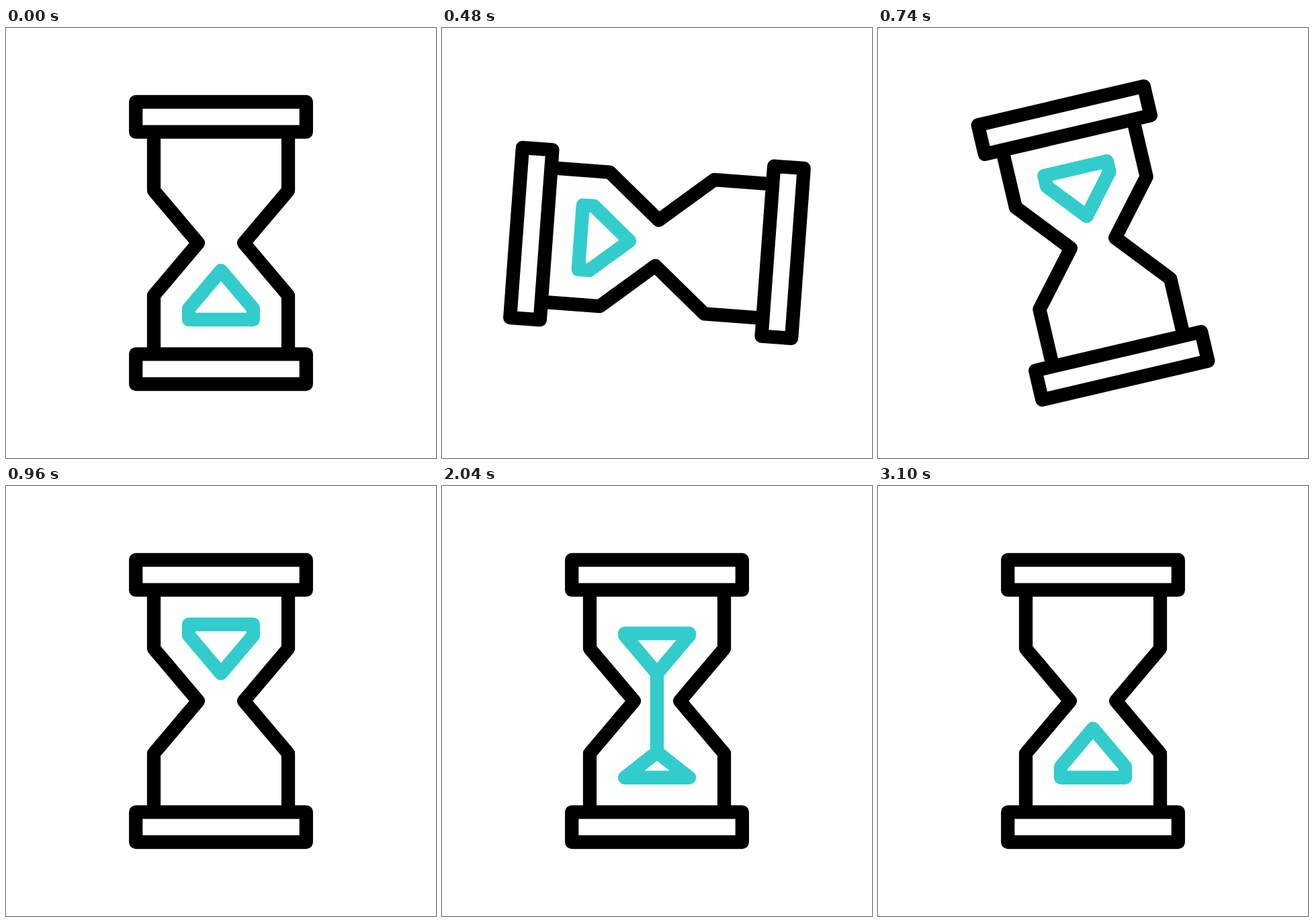
Write an HTML page that moves like this. It is 640 px wide and 640 px high and loops after 3600 ms.

```html
<!DOCTYPE html>
<html lang="en">
<head>
<meta charset="utf-8">
<title>Hourglass</title>
<style>
  html, body { margin: 0; width: 100%; height: 100%; overflow: hidden; background: #fff; }
  svg { display: block; width: 100%; height: 100%; }
  path { fill: none; stroke-width: 20.3; stroke-linecap: round; stroke-linejoin: round; }
  .glass { stroke: #000; }
  .sand { stroke: #3cc; }
</style>
</head>
<body>
<svg viewBox="0 0 640 640">
  <g id="hourglass">
    <path class="glass" d="M193.2 110H446.8V154.7H193.2Z M193.2 485.3H446.8V530H193.2Z
      M220 155V242L286 320L220 398V485 M420 155V242L354 320L420 398V485"/>
    <path class="sand" id="upper"/>
    <path class="sand" id="stream"/>
    <path class="sand" id="pile"/>
  </g>
</svg>
<script>
  const LOOP = 3600, FLIP_END = 940, POUR = 1100;
  const MID = 320, HALF = 48, SLOPE = 56.7 / HALF;
  const TOP = 206, NECK = 279, FLOOR = 434, PEAK = 361;
  const SHOULDER = NECK - HALF * SLOPE;
  const $ = id => document.getElementById(id);
  const hourglass = $('hourglass'), upper = $('upper'), stream = $('stream'), pile = $('pile');

  // Linear interpolation through [time, value] stops, held at both ends.
  function track(t, ...stops) {
    let [t0, v0] = stops[0];
    if (t <= t0) return v0;
    for (const [t1, v1] of stops.slice(1)) {
      if (t < t1) return v0 + (v1 - v0) * (t - t0) / (t1 - t0);
      [t0, v0] = [t1, v1];
    }
    return v0;
  }

  // Same curve as cubic-bezier(.5, 0, .5, 1).
  function ease(x) {
    let lo = 0, hi = 1;
    for (let i = 0; i < 24; i++) {
      const s = (lo + hi) / 2;
      if (1.5 * s * (1 - s) + s ** 3 < x) lo = s; else hi = s;
    }
    return lo * lo * (3 - 2 * lo);
  }

  // Sand outline: flat edge, two short walls, slopes meeting at the tip.
  const sandShape = (flat, wall, tip, half) =>
    `M${MID - half} ${flat}H${MID + half}V${wall}L${MID} ${tip}L${MID - half} ${wall}Z`;

  const fullPile = sandShape(FLOOR, PEAK + HALF * SLOPE, PEAK, HALF);

  function upperShape(t) {
    if (t >= 2670) return '';
    const level = track(t, [1620, TOP], [2130, SHOULDER], [2670, NECK]);
    const half = Math.min(HALF, (NECK - level) / SLOPE);
    return sandShape(level, Math.max(level, SHOULDER), NECK, half);
  }

  function pileShape(t, tip) {
    if (t < 1427) return '';
    const half = track(t, [1427, 0], [1680, HALF]);
    return sandShape(FLOOR, Math.min(FLOOR, tip + HALF * SLOPE), tip, half);
  }

  function streamShape(t, end) {
    if (t < POUR) return '';
    const lead = 421 + (t - 1400) * 0.475;
    const tail = track(t, [2660, NECK], [2980, PEAK]);
    return [[7, 0], [65, 49], [9999, 110]].map(([back, front]) => {
      const a = Math.max(tail, lead - back), b = Math.min(end, lead - front);
      return a < b ? `M${MID} ${a}V${b}` : '';
    }).join('');
  }

  function draw(t) {
    const flipping = t < FLIP_END;
    const angle = flipping ? 180 * ease(t / FLIP_END) : 0;
    const tip = track(t, [1680, FLOOR], [2220, FLOOR - HALF * SLOPE], [2680, PEAK]);
    hourglass.setAttribute('transform', `rotate(${angle} 320 320)`);
    upper.setAttribute('d', flipping ? '' : upperShape(t));
    stream.setAttribute('d', streamShape(t, tip));
    pile.setAttribute('d', flipping ? fullPile : pileShape(t, tip));
  }

  const start = performance.now();
  function tick() {
    draw((performance.now() - start) % LOOP);
    requestAnimationFrame(tick);
  }
  tick();
</script>
</body>
</html>
```
